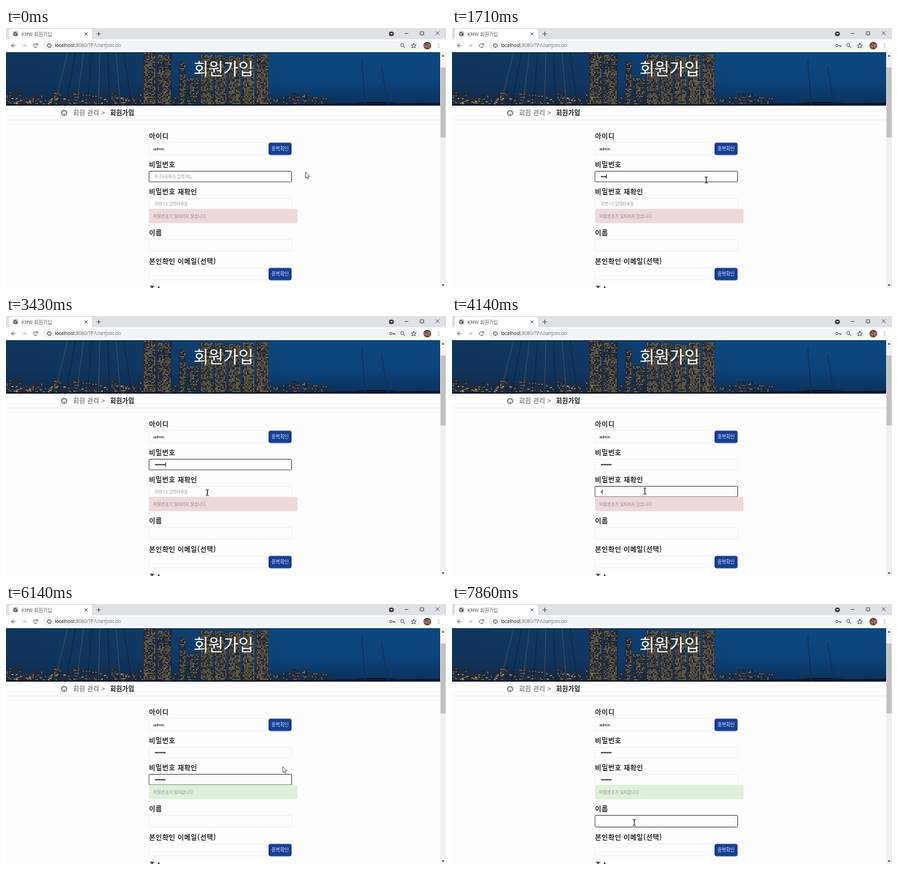
Animation of 600x355 px, one loop 8 s. Source, as an HTML page:

```html
<!DOCTYPE html>
<html lang="ko">
<head>
<meta charset="utf-8">
<title>회원가입</title>
<style>
  html, body { margin: 0; width: 100%; height: 100%; overflow: hidden; background: #fdfdfd; }
  svg { display: block; width: 600px; height: 355px; }
  text { font-family: "Noto Sans CJK KR", "Noto Sans CJK", "Noto Sans KR", sans-serif; white-space: pre; }
  .label { font-size: 9.3px; letter-spacing: .045em; font-weight: 700; fill: #2b2b2b; }
  .crumb { font-size: 8.7px; letter-spacing: .03em; font-weight: 700; }
  .small { font-size: 5.7px; fill: #999; }
  .button { font-size: 6.4px; fill: #e4e9f5; text-anchor: middle; }
  .field { fill: #fdfdfd; stroke: #f0f0f0; stroke-width: .8; }
  .field.on { stroke: #333; stroke-width: .8; }
  .line { fill: none; stroke: #50545a; stroke-width: .9; }
</style>
</head>
<body>
<svg viewBox="0 0 600 355">
  <defs>
    <linearGradient id="sky" x2="0" y2="1">
      <stop stop-color="#0c4880"/><stop offset=".55" stop-color="#0c447b"/><stop offset="1" stop-color="#0b3059"/>
    </linearGradient>
    <linearGradient id="shade">
      <stop stop-color="#14263c" stop-opacity=".5"/><stop offset=".3" stop-color="#14263c" stop-opacity=".4"/>
      <stop offset=".65" stop-color="#14263c" stop-opacity="0"/>
    </linearGradient>
    <clipPath id="bannerClip"><path d="M0 33H592V106H0z"/></clipPath>
  </defs>

  <!-- tab strip -->
  <path fill="#dee1e6" d="M0 0H600V16H0z"/>
  <path fill="#fff" d="M2 16q2 0 2-3V4q0-3 3-3H114q3 0 3 3v9q0 3 2 3zM0 15.5H600V33H0z"/>
  <circle cx="13" cy="8" r="3.3" fill="#5f6368"/>
  <path d="M10.5 7l2 1v2M13 5.2l1 1.4 1.8.4" stroke="#fff" stroke-width=".8" fill="none"/>
  <text x="21" y="10.5" font-size="6.6" fill="#55595d">KMW 회원가입</text>
  <path class="line" d="M107 6l4 4m0-4l-4 4M123.5 8h6m-3-3v6"/>
  <circle cx="525.5" cy="8" r="3.3" fill="#3c4043"/>
  <path fill="#fff" d="M524 7h3l-1.5 2z"/>
  <path class="line" d="M543.5 7.5h5M565 5h4.500v4.500H565zM586 4.500l5 5m0-5l-5 5"/>

  <!-- toolbar -->
  <rect x="50" y="17.5" width="514" height="13" rx="6.5" fill="#f1f3f4"/>
  <path class="line" d="M13 24H7.5m2.500-2.700L7.300 24l2.700 2.700"/>
  <path class="line" d="M22 24h5.500m-2.500-2.700l2.700 2.700-2.700 2.700" style="stroke:#b5b8bb"/>
  <path class="line" d="M42.600 22.600a2.700 2.700 0 1 0 .2 2.300M43 20.800v2.200h-2.200"/>
  <circle class="line" cx="59" cy="24" r="2.600"/>
  <path class="line" d="M59 23.700v1.700M59 22.200v.7"/>
  <text x="66.500" y="26.400" font-size="6.450" fill="#70757a" style="font-family:'Open Sans',sans-serif"><tspan fill="#202124">localhost</tspan>:8080/TP/UserJoin.do</text>
  <g id="key"><circle class="line" cx="524.700" cy="24" r="1.600"/><path class="line" d="M526.300 24h4v1.700m-1.500-1.700v1.500"/></g>
  <circle class="line" cx="540.300" cy="23.300" r="2"/><path class="line" d="M541.800 24.800l2.500 2.500"/>
  <path class="line" d="M556 20.800l.9 2.200 2.400.2-1.800 1.500.6 2.400-2.100-1.300-2.100 1.300.6-2.400-1.800-1.500 2.400-.2z"/>
  <circle cx="574.500" cy="24" r="5.300" fill="#74483f"/>
  <text x="574.500" y="25.700" font-size="4.400" fill="#e8dcd8" text-anchor="middle">나로</text>
  <path d="M589.500 20.800h1v1h-1zm0 2.700h1v1h-1zm0 2.700h1v1h-1z" fill="#50545a"/>

  <!-- banner -->
  <g clip-path="url(#bannerClip)">
    <path fill="url(#sky)" d="M0 33H592V106H0z"/>
    <path fill="url(#shade)" d="M0 33H592V106H0z"/>
    <g id="city"></g>
    <path fill="#0a182b" d="M0 104H360L592 102V106H0zM470 103q30-4 62-1v4h-62z"/>
    <path stroke="#1b2c44" stroke-width="1" d="M485 42L490 106M512 52L521 106"/>
  </g>
  <text x="296.500" y="64.100" font-size="22.200" font-weight="300" fill="#fff" text-anchor="middle">회원가입</text>

  <!-- breadcrumb -->
  <path stroke="#f0f0f0" d="M0 125.500H592"/>
  <circle cx="79.300" cy="116" r="4.300" fill="#858585"/>
  <path fill="#fff" d="M79.300 113.300l3 2.600h-.8v2.300h-1.500v-1.600h-1.400v1.600h-1.500v-2.300h-.8z"/>
  <text class="crumb" x="91.500" y="119.200" fill="#8c8c8c">회원 관리 &gt;</text>
  <text class="crumb" x="142" y="119.200" fill="#1a1a1a">회원가입</text>

  <g id="form"></g>

  <!-- scrollbar -->
  <path fill="#f1f1f1" d="M592 33H600V355H592z"/>
  <path fill="#c1c1c1" d="M592.500 54H599.500V149.500H592.500z"/>
  <path fill="#505050" d="M594 39l2-2.500 2 2.500zM594 350l2 2.500 2-2.500z"/>

  <path id="caret" stroke="#111" stroke-width=".8" d="M0 0v6"/>
  <path id="beam" fill="none" stroke="#111" d="M-2-4H-.6L0-3.500.6-4H2M0-3.500v7M-2 4H-.6L0 3.500.6 4H2"/>
  <path id="arrow" fill="#fff" stroke="#555" stroke-width=".8" d="M.4 0v8.200l1.900-1.700 1.300 2.900 1.300-.6-1.300-2.800h2.500z"/>
</svg>
<script>
const $ = id => document.getElementById(id);
const STEP = 1000 / 7, STEPS = 56;

// Night skyline
let seed = 7;
const rnd = () => (seed = seed * 16807 % 2147483647) / 2147483647;
const rect = (x, y, w, h, fill) => `<rect x="${x}" y="${y}" width="${w}" height="${h}" fill="${fill}"/>`;

function tower(x, top, w, lit) {
  let out = rect(x, top, w, 106 - top, '#1d2b40');
  for (let y = top + 1; y < 104; y += 2)
    for (let c = x + 1; c < x + w - 1; c += 2)
      if (rnd() < lit) out += rect(c, y, 1.4, 1.2, `hsl(${34 + rnd() * 9} 55% ${24 + rnd() * 32}%)`);
  return out;
}

let city = '';
for (let x = 0; x < 430; x += 13) city += tower(x, 87 + rnd() * 11, 11, .25);
city += tower(187, 33, 18, .6) + tower(206, 36, 20, .6) + tower(236, 46, 9, .5) + tower(246, 68, 18, .4);
for (let x = 265; x < 350; x += 19) city += tower(x, 33 + rnd() * 8, 17, .72);
for (let i = 0; i < 40; i++)
  city += rect(rnd() * 190, 94 + rnd() * 9, 2.5, 1.2, `hsl(32 65% ${35 + rnd() * 35}%)`);
for (let i = 0; i < 8; i++) {
  const x = 66 + i * 15;
  city += `<path stroke="${i % 2 ? '#152238' : '#4d4c57'}" stroke-width=".9" d="M${x} 106L${x + 18 - i * 4} 33"/>`;
}
$('city').innerHTML = city;

// Form
const text = (x, y, s, cls, extra = '') => `<text x="${x}" y="${y}" class="${cls}" ${extra}>${s}</text>`;
const rows = [
  ['아이디', 150.5, 'user', 16.5], ['비밀번호', 189.6, 'pw', 14.5], ['비밀번호 재확인', 226.6, 'again', 14.5],
  ['이름', 282.6, 'name', 16], ['본인확인 이메일(선택)', 321.5, 'mail', 16.5], ['주소', 360, 'address', 16]
];
const baseline = Object.fromEntries(rows.map(([, y, id]) => [id, y]));
const hasButton = id => id === 'user' || id === 'mail';

function row([label, y, id, h]) {
  const button = rect(358, y + 6, 31.5, 17, '#163f97" rx="3') + text(373.7, y + 16.7, '중복확인', 'button');
  return text(195, y, label, 'label') +
    `<rect id="${id}" class="field" x="195" y="${y + 5.9}" width="${hasButton(id) ? 161 : 194.5}" height="${h}" rx="1"/>` +
    (hasButton(id) ? button : '');
}

const PITCH = 1.83;
function secret(id, hint) {
  let dots = '';
  for (let i = 0; i < 8; i++)
    dots += `<circle cx="${203.9 + i * PITCH}" cy="${baseline[id] + 13.3}" r=".85" fill="#111"/>`;
  return text(203, baseline[id] + 15.3, hint, 'small', `id="${id}Hint"`) + `<g id="${id}Dots">${dots}</g>`;
}

$('form').innerHTML = rows.map(row).join('') +
  text(201, 167, 'admin', '', 'style="font:5.4px \'Liberation Sans\',sans-serif"') +
  secret('pw', '8~16자까지 입력가능') + secret('again', '한번 더 입력하세요') +
  '<rect id="box" x="195" y="247.3" width="202.5" height="19.2" rx="1.5"/>' +
  text(201, 258.8, '', 'small', 'id="note"');

// Motion, in steps
const FOCUS_AGAIN = 25, FOCUS_NAME = 49;
const typed = (n, first, rate) => n < first ? 0 : Math.min(8, Math.floor(1 + (n - first) * rate));
const home = [408, 196.7];
// Pointer legs: start, end, x, y
const legs = [
  [0, 6, 346.7, 207.5], [16, 19, 321, 249.5], [19, 26, 263, 239],
  [29, 33, 282.5, 238.8], [36, 43, 377, 222], [43, 49, 248.7, 298.3]
];

function pointer(n) {
  let [x, y] = home;
  for (const [from, to, u, v] of legs) {
    const k = Math.min(1, Math.max(0, (n - from) / (to - from))), e = k * k * (3 - 2 * k);
    x += (u - x) * e;
    y += (v - y) * e;
  }
  return [x, y];
}

const show = (id, on) => $(id).style.display = on ? '' : 'none';
const place = (id, x, y) => $(id).setAttribute('transform', `translate(${x} ${y})`);

function draw() {
  const n = Math.floor((performance.now() - start + 8) / STEP) % STEPS;
  const counts = {pw: typed(n, 6, .5), again: typed(n, 29, .9), name: 0};
  const focus = n < FOCUS_AGAIN ? 'pw' : n < FOCUS_NAME ? 'again' : 'name';
  for (const id in counts) $(id).classList.toggle('on', id === focus);
  for (const id of ['pw', 'again']) {
    show(id + 'Hint', !counts[id]);
    [...$(id + 'Dots').children].forEach((dot, i) => dot.style.display = i < counts[id] ? '' : 'none');
  }
  show('key', counts.pw);

  const match = counts.again === 8;
  $('box').setAttribute('fill', match ? '#dff0d8' : '#ecd9dc');
  $('note').textContent = match ? '비밀번호가 일치합니다.' : '비밀번호가 일치하지 않습니다.';
  $('note').style.fill = match ? '#8a9985' : '#a08588';

  // The caret stays on while typing and blinks otherwise
  const count = counts[focus];
  show('caret', count > 0 && count < 8 || (n + 2) % 7 >= 4);
  place('caret', 203.2 + count * PITCH, baseline[focus] + 10.3);

  const [x, y] = pointer(n);
  const inField = id => y > baseline[id] + 6 && y < baseline[id] + (id === 'again' ? 40 : 22);
  const overText = x > 195 && x < 390 && Object.keys(counts).some(inField);
  show('beam', overText);
  show('arrow', !overText);
  place(overText ? 'beam' : 'arrow', x, y);
  requestAnimationFrame(draw);
}
const start = performance.now();
draw();
</script>
</body>
</html>
```
